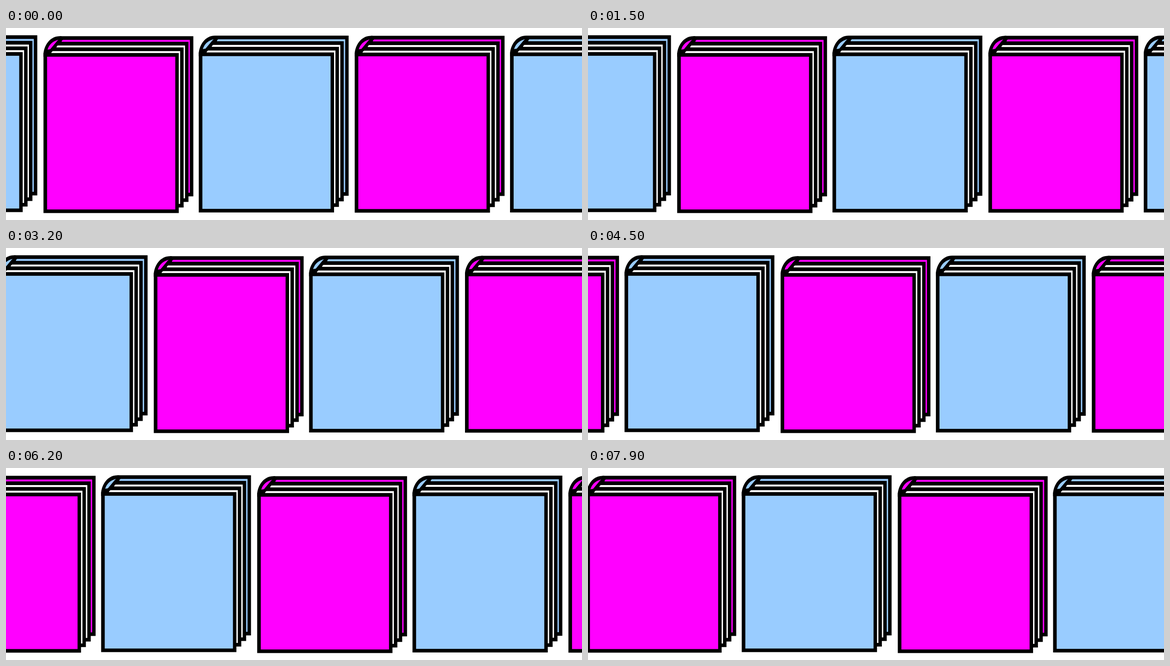
These frames come from a looping animation (1280 by 428 pixels, 8 s). An HTML page with a canvas:

```html
<!DOCTYPE html>
<html lang="en">
<head>
<meta charset="utf-8">
<title>Sliding books</title>
<style>
  html, body { margin: 0; width: 100%; height: 100%; overflow: hidden; background: #fff; }
  canvas { display: block; }
</style>
</head>
<body>
<canvas id="stage" width="1280" height="428"></canvas>
<script>
const ctx = document.getElementById('stage').getContext('2d');
const LOOP = 8000, STEP = 100, PIXELS_PER_STEP = 7.66;
const MAGENTA = '#ff00ff', BLUE = '#99ccff', WHITE = '#ffffff', BLACK = '#000000';

// Starting x, top y and cover colour of each book
const books = [
  [-608.8, 17.4, MAGENTA],
  [-263.5, 16.2, BLUE],
  [83.3, 18.3, MAGENTA],
  [428.4, 17, BLUE],
  [774.9, 17.4, MAGENTA],
  [1120.1, 17, BLUE]
];

const spine = new Path2D('M0 46V38C3 16 17 0 36 0H40L43 8L16 38V46Z');
const curl = new Path2D('M9 30Q14 13 33 8L30 11L15 29Z');

function box(left, top, right, bottom, color) {
  ctx.fillStyle = color;
  ctx.fillRect(left, top, right - left, bottom - top);
}

function sheet(depth, color) {
  const isFront = depth === 3;
  const top = 12.5 * depth;
  const right = 333 - 10.8 * depth;
  const bottom = 357 + 12.4 * depth;
  const left = isFront ? 0 : 36 - 12 * depth;
  const inner = isFront ? 8 : 40.5 - 11.5 * depth;
  box(left, top, right, bottom, BLACK);
  box(inner, top + 8.2, right - 7.7, bottom - 8, color);
}

function drawBook(x, y, color) {
  ctx.save();
  ctx.translate(x, y);
  [color, WHITE, WHITE].forEach((fill, depth) => sheet(depth, fill));
  ctx.fillStyle = BLACK;
  ctx.fill(spine);
  ctx.fillStyle = color;
  ctx.fill(curl);
  sheet(3, color);
  ctx.restore();
}

function draw(ms) {
  const shift = Math.floor((ms % LOOP) / STEP) * PIXELS_PER_STEP;
  box(0, 0, 1280, 428, WHITE);
  for (const [x, y, color] of books) drawBook(x + shift, y, color);
}

const start = performance.now();
function tick() {
  draw(performance.now() - start);
  requestAnimationFrame(tick);
}
tick();
</script>
</body>
</html>
```
